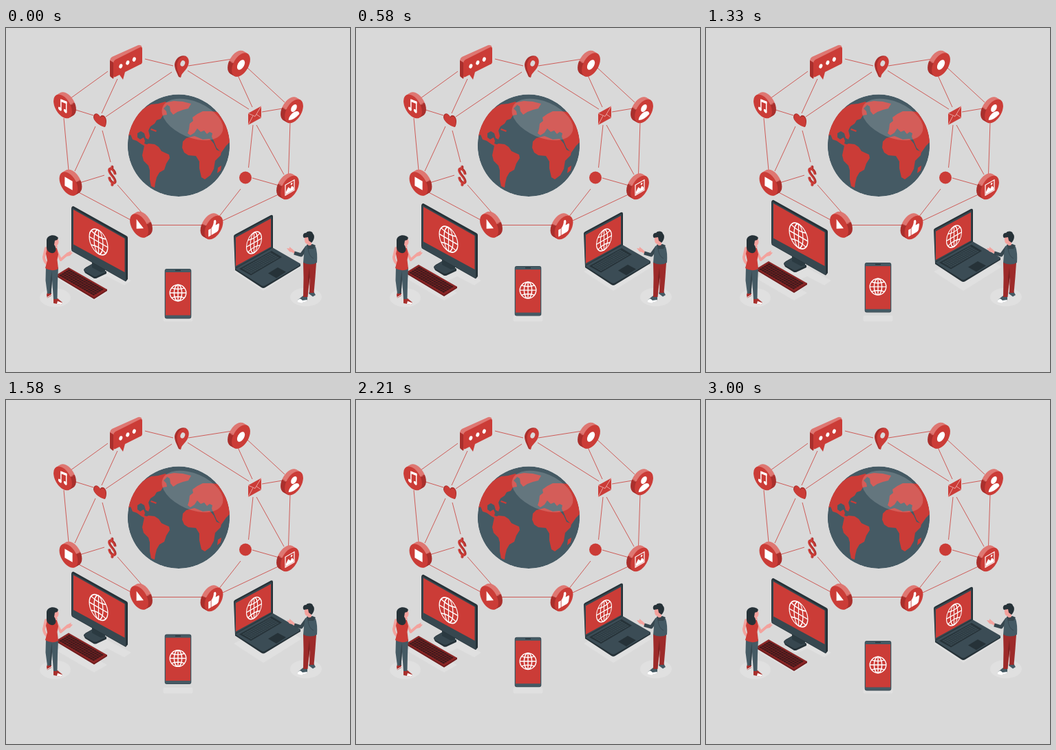
An HTML page for the animation above (3040 ms loop, 500x500 px).

```html
<!DOCTYPE html>
<html lang="en">
<head>
<meta charset="utf-8">
<title>Connected devices</title>
<style>
html, body { margin: 0; width: 100%; height: 100%; overflow: hidden; background: #d9d9d9; }
svg { display: block; width: 100%; height: 100%; }
</style>
</head>
<body>
<svg viewBox="0 0 500 500" xmlns="http://www.w3.org/2000/svg">
<defs>
  <clipPath id="earth"><circle cx="251" cy="170.7" r="74.2"/></clipPath>
  <linearGradient id="rim" x2="0" y2="1">
    <stop offset=".24" stop-color="#de7772"/><stop offset=".24" stop-color="#a92f2c"/>
  </linearGradient>
  <g id="web" fill="none" stroke="#fff">
    <circle r="1"/><ellipse rx=".48" ry="1"/>
    <path d="M0-1V1M-1 0H1M-.8-.6Q0-.32 .8-.6M-.8 .6Q0 .32 .8 .6"/>
  </g>
</defs>

<path id="links" fill="none" stroke="#cb3c37" stroke-width=".8"/>

<g clip-path="url(#earth)">
  <circle cx="251" cy="170.7" r="74.2" fill="#455a64"/>
  <g fill="#cb3c37">
    <path d="M176 158C182 134 194 118 211 111L221 110 232 107 234 112 229 117 233 121 234 126 228 127 225 132 219 134 216 139 210 143 207 149 209 157 207 162 203 160 201 153 196 150 191 153 191 159 195 162 200 159 202 164 201 168 207 170 204 173 197 169 190 164 184 162 181 155Z"/>
    <path d="M211 146l8 3-1 2-8-3Z"/>
    <path d="M201 171L207 168 216 169 222 173 226 179 237 184 238 189 233 197 230 206 223 210 219 217 217 225 216 232 211 230 209 220 209 207 207 200 200 193 198 185Z"/>
    <path d="M230 109L244 106 257 107 269 110 265 117 257 119 249 122 243 126 239 121 238 114Z"/>
    <path d="M266 147L267 139 272 135 271 130 278 125 286 121 297 121 308 122 322 145 326 165 320 171 313 181 306 174 302 164 299 158 300 153 296 151 292 154 288 149 283 151 278 146 274 152 268 156 264 153Z"/>
    <path d="M257 165L262 160 274 157 279 159 286 162 296 161 302 168 306 177 313 180 312 185 304 193 302 205 297 214 289 220 284 217 281 204 281 194 276 186 265 185 259 181 256 174Z"/>
    <path d="M308 203L313 200 312 207 307 211Z"/>
  </g>
  <ellipse cx="271" cy="133" rx="47" ry="26" transform="rotate(23 271 133)" fill="#fff" opacity=".17"/>
</g>

<!-- speech bubble -->
<path d="M151 47Q151 44 154 42L192 25Q194 24 197 26L198 32 160 54 157 73 151 70Z" fill="#de7772"/>
<path d="M151 47L156 50V74L152 71Q151 70 151 68Z" fill="#a92f2c"/>
<path d="M156 52Q156 48 159 46L195 28Q198 27 198 30V49Q198 52 195 53L173 64 170 75 165 68 159 71Q156 72 156 69Z" fill="#cb3c37"/>
<g fill="#fff"><ellipse cx="167" cy="55.500" rx="2.400" ry="3.300" transform="rotate(20 167 55)"/><ellipse cx="177" cy="50.500" rx="2.400" ry="3.300" transform="rotate(20 177 50)"/><ellipse cx="186.500" cy="45.500" rx="2.400" ry="3.300" transform="rotate(20 186 45)"/></g>

<!-- pin -->
<path d="M251 71C248 64 245 59 245 53 246 44 254 38 262 41L254 72Z" fill="#a92f2c"/>
<path d="M253.500 72C251 65 248 61 248.500 54 249 46 255 40 261 41 267 43 267 52 263 58 260 63 255 66 253.500 72Z" fill="#cb3c37"/>
<ellipse cx="257" cy="51.500" rx="3.200" ry="4.400" transform="rotate(22 257 51)" fill="#d9d9d9"/>

<!-- heart -->
<path d="M144 144C138 142 128 137 127 130 127 123 133 122 137 129 139 124 146 128 146 135 146 140 145 142 144 144Z" fill="#a92f2c"/>
<path d="M143 144C136 142 129 137 128 131 128 124 134 123 137.500 131 139 126 145 129 145 136 145 140 144 142 143 144Z" fill="#cb3c37"/>

<!-- envelope -->
<path d="M352 124L371 113.500V130.500L352 141Z" fill="#cb3c37"/>
<path d="M352 124L362 128.500 371 113.500M352 141L359 127.500M371 130.500L364 125.500" fill="none" stroke="#eeb0ad" stroke-width=".9"/>

<!-- dollar -->
<g fill="none" stroke-width="2.900">
  <path id="dollar" d="M5-4.500C4.500-11-5-11-5-5.500-5 0 5 0 5 5.500 5 11-4.500 11-5 4.500M0-14.500V-9.500M0 9.500V14.500" stroke="#a92f2c" transform="matrix(.866 .5 0 1 155 214.500)"/>
  <path d="M5-4.500C4.500-11-5-11-5-5.500-5 0 5 0 5 5.500 5 11-4.500 11-5 4.500M0-14.500V-9.500M0 9.500V14.500" stroke="#cb3c37" transform="matrix(.866 .5 0 1 153.700 215.200)"/>
</g>

<circle cx="348" cy="217.500" r="9" fill="#cb3c37"/>
<g id="badges"></g>

<!-- ground shadows -->
<g fill="#e0e0e0">
  <ellipse cx="71.500" cy="392" rx="22.500" ry="13.500"/>
  <ellipse cx="436" cy="391" rx="23" ry="13.500"/>
  <path d="M112 352L130 340 182 367 172 374 147 361 130 369Z"/>
  <path d="M73 364L91 353 147 385 128 396Z"/>
  <path d="M331 354L388 324 430 347 374 382Z"/>
  <rect x="228.500" y="418" width="43" height="8.500" rx="2"/>
</g>

<g id="devices">
  <!-- monitor -->
  <path d="M113 352Q113 350 116 348L125 343 146 354V357L131 364H128L115 356Z" fill="#263238"/>
  <path d="M113 351L125 343 146 354 131 361H128L115 354Z" fill="#37474f"/>
  <path d="M125 336L144 346V354L138 355 125 348Z" fill="#2b3a41"/>
  <path d="M95 263Q95 259 98 259L175 302Q177 303 177 305V365L174 368.500 97 325Q95 324 95 321Z" fill="#263238"/>
  <path d="M96 263Q96 261 98 262L172 304Q174 305 174 307V368L98 325Q96 324 96 322Z" fill="#37474f"/>
  <path d="M98 264L172.500 306V355L98 314.500Z" fill="#cb3c37"/>
  <use href="#web" transform="matrix(13.400 7.700 0 17.200 134.500 311)" stroke-width=".095"/>
  <!-- keyboard -->
  <path d="M73 359V361L128 394 147 382V380Z" fill="#6e1a1b"/>
  <path d="M73 359L91 348 147 380 128 392Z" fill="#8a2626"/>
  <path id="keys" fill="#40191b" transform="matrix(55 32 -18 11 91 348.500)"/>
  <!-- laptop -->
  <path d="M331 303Q331 301 333 300L385 272Q388 271 388 274V320L333 351Z" fill="#263238"/>
  <path d="M332 303L386 274V319L333 349Z" fill="#37474f"/>
  <path d="M334 304.500L385 277V318L334 346Z" fill="#cb3c37"/>
  <use href="#web" transform="matrix(11 -6.300 0 14.700 360.500 312)" stroke-width=".1"/>
  <path d="M333 349V352L371 377Q374 379 377 377L428 346V343Z" fill="#263238"/>
  <path d="M333 350L388 319.500 427 342Q429 343 427 345L377 374Q374 376 371 374Z" fill="#3b4c55"/>
  <path d="M339 350L386 324 401 333 356 359.500Z" fill="#263238"/>
  <path id="laptopKeys" fill="#37474f" transform="matrix(45 -26 16 9.500 340 350)"/>
  <path d="M381 356.500L395 348 407 354.500 393 363.500Z" fill="#263238"/>
  <!-- phone -->
  <rect x="230.700" y="350" width="38.600" height="72.500" rx="3" fill="#37474f"/>
  <rect x="231.400" y="350.600" width="37.200" height="71.200" rx="2.600" fill="#455a64"/>
  <rect x="232" y="355" width="36" height="62.500" fill="#cb3c37"/>
  <path d="M246 352.500H254" stroke="#263238" stroke-width="1.400"/>
  <use href="#web" transform="translate(250 385) scale(11.800)" stroke-width=".12"/>
</g>

<!-- woman -->
<g>
  <path d="M60 384L66 385 66 389 60 392.500 59 388Z" fill="#a92f2c"/>
  <path d="M60 391.500L67 387" stroke="#fff" stroke-width="1"/>
  <path d="M69 393H75L82 399 80 402 69 400Z" fill="#a92f2c"/>
  <path d="M75 397L82 399.500 80 402 74 401Z" fill="#fff"/>
  <path d="M58 347L76 348 75 370 74.500 394H69L67 366 65.500 386H60L57.500 367Z" fill="#455a64"/>
  <path d="M67 353L67 366 65.500 386H63L65 363Z" fill="#37474f"/>
  <path d="M58 320L55 333Q55 339 61 344" fill="none" stroke="#f3a29d" stroke-width="4" stroke-linecap="round"/>
  <path d="M73 323L79.500 337 90 328" fill="none" stroke="#f3a29d" stroke-width="3.800" stroke-linejoin="round"/>
  <path d="M88 327L95 323.500 94 326 97 326.500 93 331 88 332Z" fill="#f3a29d"/>
  <path d="M60 319Q67 316 74 320L76 329 74.500 337 76 350Q67 355 57 349L60 338 58 328Z" fill="#cb3c37"/>
  <ellipse cx="72" cy="310.500" rx="4.500" ry="6.500" fill="#f3a29d"/>
  <path d="M70 313V321L75 319 73 313Z" fill="#f3a29d"/>
  <path d="M59 308C60 300 72 299 76 305L74.500 308 71 309 70 315C73 319 74 325 69 327 64 328 59 324 59 319Z" fill="#263238"/>
</g>

<!-- man -->
<g>
  <path d="M441 383H447L450 388 446 390.500 440 386Z" fill="#455a64"/>
  <path d="M432 389H438L438 396 431 399 424 398 425 394.500Z" fill="#455a64"/>
  <path d="M424 396Q427 391 431 396L438 395 437 397 430 399.500 424 398.500Z" fill="#fff"/>
  <path d="M432 340L451 341 449.500 362 447.500 385H441L441.500 362 438.500 391H432L432.500 363Z" fill="#9d2b2a"/>
  <path d="M441 348L441.500 362 440 375 439 363Z" fill="#7d2121"/>
  <path d="M419 328L416 326 412 325 408 320 412 320.500 412 318 417 322 421 326Z" fill="#f3a29d"/>
  <path d="M437 319L429 330 419 327" fill="none" stroke="#37474f" stroke-width="5" stroke-linejoin="round"/>
  <path d="M435 317Q444 312 450 318 453 326 452 341 443 346 432 341L433 329Z" fill="#455a64"/>
  <path d="M437 315Q443 312 450 316L447 321 439 321Z" fill="#37474f"/>
  <path d="M439 320Q440 332 447 335" fill="none" stroke="#37474f" stroke-width="1"/>
  <path d="M434 302L444 303 444 315Q440 318 438 314 433 314 434 302Z" fill="#f3a29d"/>
  <path d="M433 305C430 302 433 297 436 298 438 294 446 295 446 299 450 302 447 310 444 312L440 309 439 304Z" fill="#263238"/>
</g>
</svg>

<script>
const byId = id => document.getElementById(id);

const links = `202 45 243 55,265 55 329 45,351 58 405 108,264 62 353 118,337 69 358 115,
372 122 402 117,413 137 410.500 213,364 141 404 213,359 141 352.500 203,358 218 397 229,
400 240 315 280,341 234 309 275,284 286.500 211 286.500,185 281 104 238,197 268 162 228,
107 225 143 214,91 207 84 131,100 208 130 143,152 195 140 149,98 118 127 127,
94 102 148 63,139 124 162 74,145 129 241 64`;
byId('links').setAttribute('d', links.split(',').map(p => 'M' + p.trim()).join(''));

const icons = {
  note: `<path d="M-3 6V-8L6-9.500V4" fill="none" stroke="#fff" stroke-width="1.700"/>
    <path d="M-3-9L6.800-10.500V-7L-3-5.500Z" fill="#fff"/>
    <ellipse cx="-4.800" cy="6" rx="2.800" ry="2.500" fill="#fff"/><ellipse cx="4.300" cy="4.500" rx="2.800" ry="2.500" fill="#fff"/>`,
  square: '<rect x="-6.500" y="-7" width="13" height="13" fill="#fff"/>',
  circle: '<circle r="6.500" fill="#fff"/>',
  play: '<path d="M-4.500-7.500L7.500 0-4.500 6.500Z" fill="#fff"/>',
  person: '<circle cy="-4.500" r="5" fill="#fff"/><path d="M-9 8.500C-9-1 9-1 9 8.500Q0 13-9 8.500Z" fill="#fff"/>',
  photo: `<rect x="-7.500" y="-7.500" width="15" height="15" fill="none" stroke="#fff" stroke-width="1.400"/>
    <path d="M-6.500 6.500V3L-2.500-2 1 2 3.500-1 6.500 3V6.500Z" fill="#fff"/><circle cx="3" cy="-4" r="1.500" fill="#fff"/>`,
  thumb: `<path d="M-9-1H-5V9H-9Z" fill="#fff"/>
    <path d="M-4-1Q0-4 0-10 4-11 4-6L3-2H8Q10-1 9 2L8 7Q7 9 5 9H-4Z" fill="#fff"/>`
};

// side is 1 for discs whose rim shows on the right, -1 for the left
function badge(x, y, side, icon) {
  const disc = (k, color) =>
    `<circle r="15.500" fill="${color}" transform="matrix(.866 ${side / 2} 0 1 ${x + side * k} ${y - k * .58})"/>`;
  let rim = '';
  for (let k = 6; k > 0; k--) rim += disc(k, 'url(#rim)');
  return rim + disc(0, '#cb3c37') +
    `<g transform="matrix(.866 ${side / 2} 0 1 ${x} ${y})">${icons[icon]}</g>`;
}

byId('badges').innerHTML = [
  [82.5, 114, 1, 'note'], [91, 226.5, 1, 'square'], [193.5, 287.5, 1, 'play'],
  [341.5, 53.5, -1, 'circle'], [418.5, 121, -1, 'person'],
  [412.5, 232, -1, 'photo'], [302, 290, -1, 'thumb']
].map(args => badge(...args)).join('');

function keyGrid(rows, cols) {
  let d = '';
  for (let r = 0; r < rows; r++)
    for (let c = 0; c < cols; c++) {
      const x = .04 + c * .92 / cols, y = .08 + r * .84 / rows;
      d += `M${x} ${y}h${.8 / cols}v${.7 / rows}h${-.8 / cols}Z`;
    }
  return d;
}
byId('keys').setAttribute('d', keyGrid(5, 16));
byId('laptopKeys').setAttribute('d', keyGrid(5, 14));

const LOOP = 3040, FLOAT = 3000, STEP = 1000 / 24, RISE = 10;
const start = performance.now();

function render(time) {
  const stepped = Math.floor((time + 5) / STEP) * STEP;
  const t = Math.min(stepped, FLOAT);
  const lift = RISE * (1 - Math.abs(2 * t / FLOAT - 1));
  byId('devices').setAttribute('transform', `translate(0 ${-lift})`);
}

function tick() {
  render((performance.now() - start) % LOOP);
  requestAnimationFrame(tick);
}
tick();
</script>
</body>
</html>
```
